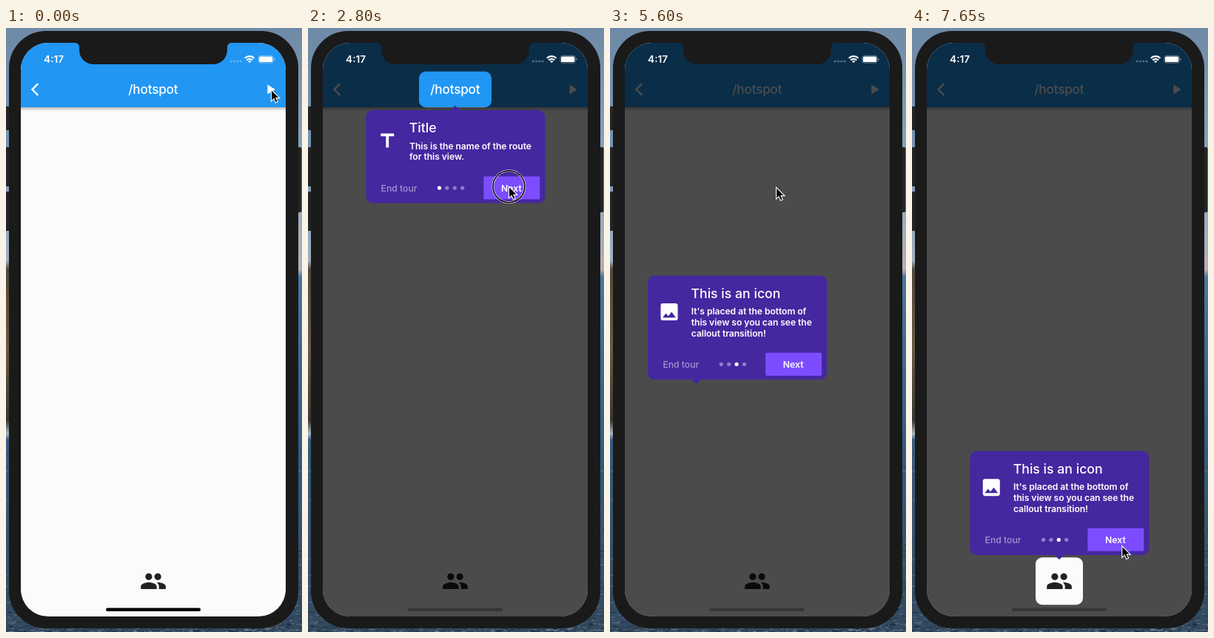
Write an HTML page that moves like this. It is 400 px wide and 816 px high and loops after 8000 ms.

```html
<!DOCTYPE html>
<html lang="en">
<head>
<meta charset="utf-8">
<title>Hotspot tour</title>
<style>
  html, body { margin: 0; width: 100%; height: 100%; overflow: hidden; background: #1a1a1a; }
  svg { display: block; width: 100%; height: 100%; }
  text { font-family: Inter, "Open Sans", sans-serif; fill: #fff; white-space: pre; }
  .nav { font-size: 17.1px; font-weight: 500; letter-spacing: -0.01em; }
  .title { font-size: 17.7px; font-weight: 500; }
  .body { font-size: 12.15px; font-weight: 600; letter-spacing: -0.005em; }
  .btn { font-size: 12.2px; font-weight: 600; }
  .end { font-size: 12.2px; font-weight: 500; opacity: .5; }
  .mid { text-anchor: middle; }
</style>
</head>
<body>
<svg viewBox="0 0 400 816" xmlns="http://www.w3.org/2000/svg">
  <defs>
    <linearGradient id="left" x2="0" y2="1">
      <stop offset="0" stop-color="#6f8aa6"/><stop offset=".2" stop-color="#7593b3"/>
      <stop offset=".385" stop-color="#9fb0bf"/><stop offset=".4" stop-color="#51483b"/>
      <stop offset=".53" stop-color="#6b5a44"/><stop offset=".65" stop-color="#3a3833"/>
      <stop offset=".672" stop-color="#a9b4bf"/><stop offset=".682" stop-color="#3b5c7c"/>
      <stop offset="1" stop-color="#33495f"/>
    </linearGradient>
    <linearGradient id="right" x2="0" y2="1">
      <stop offset="0" stop-color="#6f8aa6"/><stop offset=".25" stop-color="#8ba8c4"/>
      <stop offset=".4" stop-color="#b5aeb4"/><stop offset=".412" stop-color="#4b769f"/>
      <stop offset=".7" stop-color="#355b80"/><stop offset="1" stop-color="#33495f"/>
    </linearGradient>
    <linearGradient id="shade" x2="0" y2="1">
      <stop offset="0" stop-color="#000" stop-opacity=".28"/><stop offset="1" stop-color="#000" stop-opacity="0"/>
    </linearGradient>
    <clipPath id="screen"><rect x="20" y="20" width="358" height="775" rx="37"/></clipPath>
  </defs>

  <rect width="200" height="816" fill="url(#left)"/>
  <rect x="200" width="200" height="816" fill="url(#right)"/>
  <path id="light" stroke="#8fa3b5" stroke-opacity=".45"/>
  <path id="dark" stroke="#101c2a" stroke-opacity=".5"/>
  <g fill="#222426">
    <rect x="-3" y="106" width="9" height="32" rx="1"/>
    <rect x="-3" y="161" width="9" height="53" rx="1"/>
    <rect x="-3" y="221" width="9" height="53" rx="1"/>
    <rect x="390" y="161" width="9.5" height="88" rx="2"/>
  </g>
  <rect x="4" y="4" width="391" height="807" rx="50" fill="#1a1a1a"/>

  <g clip-path="url(#screen)">
    <rect x="20" y="20" width="358" height="775" fill="#fbfbfb"/>
    <rect x="20" y="107" width="358" height="5" fill="url(#shade)"/>
    <rect x="20" y="20" width="358" height="87" fill="#2196f3"/>
    <path d="M43.3 75.2 35.5 83l7.8 7.8" fill="none" stroke="#fff" stroke-width="2.4"/>
    <path d="M353.4 76.5v13l10.3-6.5z" fill="#fff"/>
    <text class="nav mid" x="198.8" y="89">/hotspot</text>
    <path transform="translate(180.7 729) scale(1.53)" fill="#212121" d="M16 11c1.66 0 2.99-1.34 2.99-3S17.66 5 16 5s-3 1.34-3 3 1.34 3 3 3zM8 11c1.66 0 2.99-1.34 2.99-3S9.66 5 8 5 5 6.34 5 8s1.34 3 3 3zM8 13c-2.33 0-7 1.17-7 3.5V19h14v-2.5C15 14.17 10.33 13 8 13zM16 13c-.29 0-.62.02-.97.05 1.16.84 1.97 1.97 1.97 3.45V19h6v-2.5c0-2.33-4.67-3.5-7-3.5z"/>
    <g id="tour">
      <path id="scrim" fill-rule="evenodd" fill-opacity=".7"/>
      <g id="callout">
        <rect id="card" width="242" rx="9" fill="#4527a0"/>
        <path id="arrow" fill="#4527a0"/>
        <path id="icon" fill="#fff"/>
        <text id="head" class="title" x="58.4" y="30.2"></text>
        <g id="lines"></g>
        <g id="foot">
          <text class="end" x="20.3" y="-16">End tour</text>
          <g id="dots" fill="#fff"></g>
          <rect x="159" y="-36.2" width="76" height="31" rx="1.5" fill="#7c4dff"/>
          <text class="btn mid" x="196.6" y="-16">Next</text>
        </g>
      </g>
    </g>
    <rect id="home" x="135" y="783.6" width="128" height="4.4" rx="2.2"/>
    <path d="M92 20c5 0 7 2 7 7v2c0 12 8 20 20 20h160c12 0 20-8 20-20v-2c0-5 2-7 7-7v-4H92z" fill="#1a1a1a"/>
  </g>

  <text class="mid" x="64.6" y="47" font-size="13.6" font-weight="600">4:17</text>
  <g fill="#fff">
    <g opacity=".3">
      <circle cx="304.2" cy="45" r="1.6"/><circle cx="308.5" cy="45" r="1.6"/>
      <circle cx="312.8" cy="45" r="1.6"/><circle cx="317.1" cy="45" r="1.6"/>
    </g>
    <path d="M322.8 40.7a9.2 9.2 0 0 1 12.8 0M325.2 43.4a5.8 5.8 0 0 1 8 0" fill="none" stroke="#fff" stroke-width="2.2"/>
    <path d="M329.2 47.3l-2.2-2.3a3.2 3.2 0 0 1 4.4 0z"/>
    <rect x="340.9" y="37.4" width="20.4" height="9.8" rx="2.8" fill="none" stroke="#fff" stroke-opacity=".4" stroke-width=".9"/>
    <rect x="342" y="38.5" width="18.2" height="7.6" rx="1.7"/>
    <path d="M362.4 40.6c1.7.6 1.7 2.9 0 3.5z" opacity=".5"/>
  </g>

  <g id="mouse">
    <g id="ring" fill="none">
      <circle r="21.5" stroke="#fff" stroke-opacity=".8" stroke-width="3"/>
      <circle r="21.5" stroke="#000" stroke-width="1.5"/>
    </g>
    <path d="M0 0v15.6l3.6-3.4 2.3 5.4 2.9-1.2-2.3-5.2h4.9z" fill="#000" stroke="#fff" stroke-width="1.1"/>
  </g>
</svg>
<script>
const $ = id => document.getElementById(id);
const LOOP = 8000, MOVE = 500;

// hole: centre x, centre y, width, height; card: left, top, height
const steps = [
  { start: 108, hole: [199, 83, 98, 48.4], card: [78.3, 111, 125.6], up: true, title: 'Title',
    lines: ['This is the name of the route', 'for this view.'],
    icon: 'M5 4v3h5.5v12h3V7H19V4z' },
  { start: 2862, hole: [44, 82.7, 76.6, 76.5], card: [27, 124.8, 111.4], up: true, title: 'Back button',
    lines: ['This is a Flutter back button.'],
    icon: 'M10.09 15.59 11.5 17l5-5-5-5-1.41 1.41L12.67 11H3v2h9.67zM19 3H5c-1.11 0-2 .9-2 2v4h2V5h14v14H5v-4H3v4c0 1.1.89 2 2 2h14c1.1 0 2-.9 2-2V5c0-1.1-.9-2-2-2z' },
  { start: 5432, hole: [199, 747.2, 64, 64], card: [78.3, 571.6, 140.4], up: false, title: 'This is an icon',
    lines: ["It's placed at the bottom of", 'this view so you can see the', 'callout transition!'],
    icon: 'M21 19V5c0-1.1-.9-2-2-2H5c-1.1 0-2 .9-2 2v14c0 1.1.9 2 2 2h14c1.1 0 2-.9 2-2zM8.5 13.5l2.5 3.01L14.5 12l4.5 6H5z' }
];
const clicks = [50, 2800, 5400], RING = 100;
// start, end, x, y
const trips = [
  [0, 0, 358.4, 83.4], [2050, 2600, 271.4, 214.2],
  [4600, 4800, 224.6, 215.4], [6850, 7650, 283.8, 699.9]
];

const clamp = v => Math.min(1, Math.max(0, v));
const mix = (a, b, p) => a + (b - a) * p;
const mixAll = (a, b, p) => a.map((v, i) => mix(v, b[i], p));
const smooth = p => p * p * (3 - 2 * p);

// cubic-bezier(.4, 0, .2, 1)
function ease(x) {
  let lo = 0, hi = 1;
  for (let i = 0; i < 24; i++) {
    const u = (lo + hi) / 2, v = 1 - u;
    if (1.2 * u * v * v + .6 * u * u * v + u * u * u < x) lo = u; else hi = u;
  }
  return smooth(lo);
}

function roundRect(x, y, w, h, r) {
  return `M${x + r} ${y}h${w - 2 * r}a${r} ${r} 0 0 1 ${r} ${r}v${h - 2 * r}a${r} ${r} 0 0 1 ${-r} ${r}` +
    `h${2 * r - w}a${r} ${r} 0 0 1 ${-r} ${-r}v${2 * r - h}a${r} ${r} 0 0 1 ${r} ${-r}z`;
}

// short ripples on the water behind the phone
function waves(seed, count) {
  const rnd = () => (seed = seed * 16807 % 2147483647) / 2147483647;
  let d = '';
  for (let i = 0; i < count; i++) d += `M${rnd() * 400} ${816 - 256 * rnd() ** 2}h${2 + rnd() * 5}`;
  return d;
}
$('light').setAttribute('d', waves(7, 900));
$('dark').setAttribute('d', waves(31, 900));

let shown = -1;
function fill(n) {
  if (n === shown) return;
  shown = n;
  const s = steps[n], h = s.card[2];
  $('card').setAttribute('height', h);
  $('icon').setAttribute('d', s.icon);
  $('icon').setAttribute('transform', `translate(13.6 ${(h - 43) / 2 - 15}) scale(1.28)`);
  $('head').textContent = s.title;
  $('lines').innerHTML = s.lines.map((l, i) =>
    `<text class="body" x="58.7" y="${52.5 + i * 14.75}">${l}</text>`).join('');
  $('foot').setAttribute('transform', `translate(0 ${h})`);
  $('dots').innerHTML = [0, 1, 2, 3].map(i =>
    `<circle cx="${99.2 + i * 10.4}" cy="-20.6" r="2.6" opacity="${i === n ? 1 : .4}"/>`).join('');
}

function draw(t) {
  let n = 0;
  while (n < 2 && t >= steps[n + 1].start) n++;
  const to = steps[n], from = steps[Math.max(0, n - 1)];
  const p = ease(clamp((t - to.start) / MOVE));
  const [cx, cy, w, h] = mixAll(from.hole, to.hole, p);
  const [x, y] = mixAll(from.card, to.card, p);

  fill(n);
  const fade = n ? 1 : p;
  $('tour').setAttribute('opacity', fade);
  $('scrim').setAttribute('d', 'M20 20h358v775H20z' + roundRect(cx - w / 2, cy - h / 2, w, h, 9));
  $('callout').setAttribute('transform', `translate(${x} ${y})`);
  const ax = cx - x, base = to.up ? 1 : to.card[2] - 1, tip = to.up ? -7.5 : 7.2;
  $('arrow').setAttribute('d', `M${ax - 7.3} ${base}h14.6l-7.3 ${tip}z`);
  const g = Math.round(54 * fade * fade);
  $('home').setAttribute('fill', `rgb(${g},${g},${g})`);

  let [, , mx, my] = trips[0];
  for (const [a, b, tx, ty] of trips.slice(1)) {
    const q = smooth(clamp((t - a) / (b - a)));
    mx = mix(mx, tx, q);
    my = mix(my, ty, q);
  }
  $('mouse').setAttribute('transform', `translate(${mx} ${my})`);
  $('ring').setAttribute('opacity', clicks.some(c => t >= c && t < c + RING) ? 1 : 0);
}

const begin = performance.now();
(function tick() {
  draw((performance.now() - begin) % LOOP);
  requestAnimationFrame(tick);
})();
</script>
</body>
</html>
```
